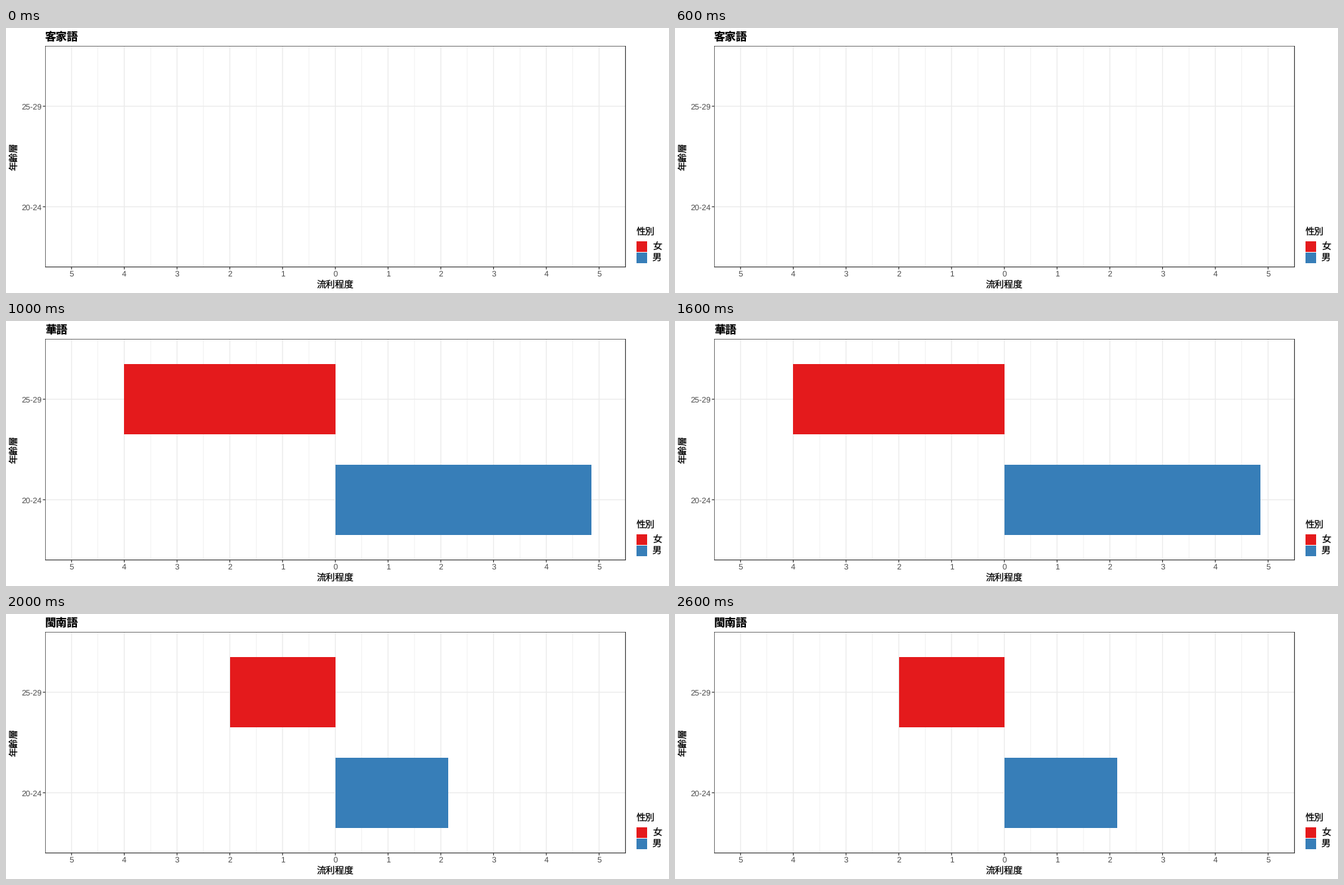
Write a matplotlib script that moves like this. It is 1000 by 400 pixels and loops after 3000 ms.

```python
import matplotlib.pyplot as plt
from matplotlib.animation import FuncAnimation
from matplotlib.patches import Rectangle

plt.rcParams["text.hinting"] = "none"
plt.rcParams["text.hinting_factor"] = 1

WIDTH, HEIGHT, DPI = 1000, 400, 72  # at 72 dpi one point is one pixel
LEFT, RIGHT, TOP, BOTTOM = 59, 934.5, 27, 361
ZERO, UNIT = 496.7, 79.57
ROW_Y = {"25-29": 118.1, "20-24": 269.8}
BAR_HEIGHT = 106

RED, BLUE = "#E41A1C", "#377EB8"
GRID, DARK, TICK_TEXT = "#EBEBEB", "#333333", "#4D4D4D"
CJK, LATIN = "Noto Sans CJK JP", "Liberation Sans"

# language, mean fluency of women aged 25-29, mean fluency of men aged 20-24
LANGUAGES = [("客家語", 0, 0), ("華語", 4, 34 / 7), ("閩南語", 2, 15 / 7)]

fig = plt.figure(figsize=(WIDTH / DPI, HEIGHT / DPI), dpi=DPI, facecolor="white")
ax = fig.add_axes([0, 0, 1, 1])
ax.set_xlim(0, WIDTH)
ax.set_ylim(HEIGHT, 0)
ax.axis("off")


def line(x0, y0, x1, y1, color, width, z=1):
    ax.plot([x0, x1], [y0, y1], color=color, lw=width, zorder=z,
            solid_capstyle="butt", snap=False)


def box(x, y, w, h, color):
    return ax.add_patch(Rectangle((x, y), w, h, fc=color, ec="none", lw=0, zorder=2))


def label(x, y, text, size=14, color="black", font=CJK, **kwargs):
    return ax.text(x, y, text, fontsize=size, color=color, family=font,
                   va="baseline", **kwargs)


def draw_grid():
    for i in range(-5, 5):
        x = ZERO + (i + 0.5) * UNIT
        line(x, TOP, x, BOTTOM, GRID, 0.68)
    for y in ROW_Y.values():
        line(LEFT, y, RIGHT, y, GRID, 1.36)
    for i in range(-5, 6):
        x = ZERO + i * UNIT
        line(x, TOP, x, BOTTOM, GRID, 1.36)


def draw_axes():
    line(LEFT, TOP + 0.35, RIGHT, TOP + 0.35, DARK, 0.7, 3)
    line(LEFT + 0.35, TOP, LEFT + 0.35, BOTTOM, DARK, 0.7, 3)
    line(934.4, TOP, 934.4, BOTTOM, DARK, 1.15, 3)
    line(LEFT, 360.7, 935, 360.7, DARK, 1.15, 3)
    for i in range(-5, 6):
        x = ZERO + i * UNIT
        line(x, BOTTOM, x, BOTTOM + 3.4, DARK, 1.2)
        label(x, 375, str(abs(i)), 12, TICK_TEXT, LATIN, ha="center")
    for name, y in ROW_Y.items():
        line(LEFT - 3.4, y, LEFT, y, DARK, 1.2)
        label(53.6, y + 4.6, name, 12, TICK_TEXT, LATIN, ha="right")
    label(497, 392, "流利程度", ha="center")
    label(16, 194, "年齡層", ha="center", rotation=90, rotation_mode="anchor")


def draw_legend():
    label(951, 312, "性別")
    for y, color, name in ((322, RED, "女"), (339, BLUE, "男")):
        box(951, y, 16, 15.5, color)
        label(975, y + 12, name)


draw_grid()
draw_axes()
draw_legend()
title = label(59, 18, "", 16.8, weight="bold")
women = box(ZERO, ROW_Y["25-29"] - BAR_HEIGHT / 2, 0, BAR_HEIGHT, RED)
men = box(ZERO, ROW_Y["20-24"] - BAR_HEIGHT / 2, 0, BAR_HEIGHT, BLUE)


def update(frame):
    name, women_value, men_value = LANGUAGES[frame % len(LANGUAGES)]
    title.set_text(name)
    women.set_width(-women_value * UNIT)
    men.set_width(men_value * UNIT)
    for bar, value in ((women, women_value), (men, men_value)):
        bar.set_visible(value > 0)
    return title, women, men


anim = FuncAnimation(fig, update, frames=len(LANGUAGES), interval=1000,
                     repeat=True, repeat_delay=0)
plt.show()
```
